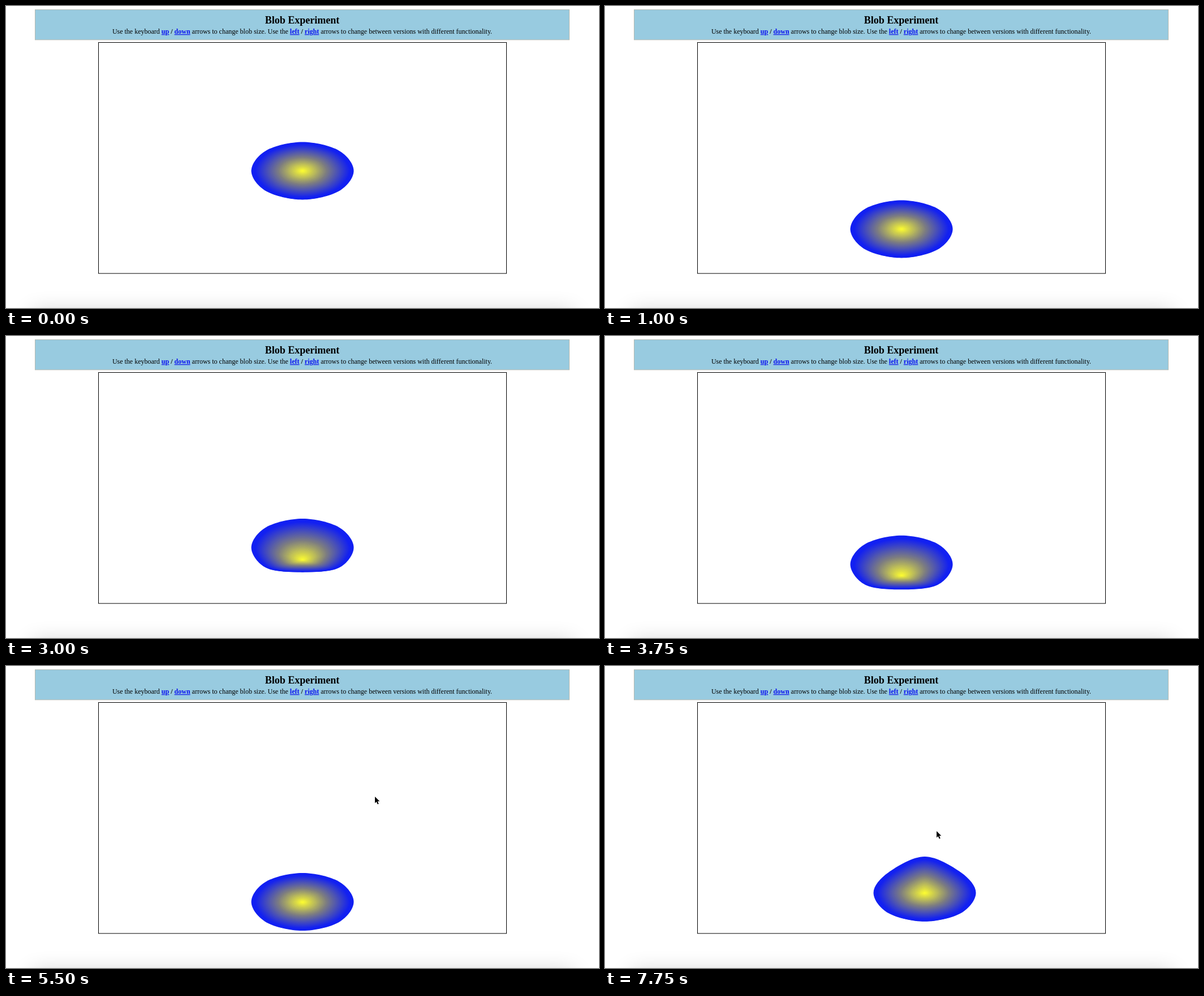
Recreate the animation shown at these times as an HTML page with a canvas. Size 1048 px wide and 534 px high, loop 8000 ms.

```html
<!DOCTYPE html>
<html lang="en">
<head>
<meta charset="utf-8">
<title>Blob Experiment</title>
<style>
  html, body { margin: 0; width: 100%; height: 100%; overflow: hidden; background: #fff; }
  #stage { position: relative; width: 1048px; height: 534px; overflow: hidden; }
  #page, #blob { position: absolute; left: 0; top: 0; }
  #shadow {
    position: absolute; left: 46px; top: 541px; width: 956px; height: 60px;
    box-shadow: 0 0 38px rgba(0, 0, 0, .2);
  }
  text { font-family: "Liberation Serif", "Times New Roman", serif; font-size: 12px; text-anchor: middle; }
  .title { font-size: 18px; font-weight: bold; }
  .keys { font-weight: bold; }
  .link { fill: #0a14f0; text-decoration: underline; }
</style>
</head>
<body>
<div id="stage">
  <div id="shadow"></div>
  <svg id="page" width="1048" height="534">
    <rect x="51.5" y="6.5" width="944" height="53.3" fill="#98cbe0" stroke="#b4bab2"/>
    <text class="title" x="523.5" y="30.5">Blob Experiment</text>
    <text x="523.5" y="49">Use the keyboard <tspan class="keys"><tspan class="link">up</tspan> / <tspan class="link">down</tspan></tspan> arrows to change blob size. Use the <tspan class="keys"><tspan class="link">left</tspan> / <tspan class="link">right</tspan></tspan> arrows to change between versions with different functionality.</text>
    <rect x="163.5" y="64.5" width="721" height="408.4" fill="#fff" stroke="#000"/>
  </svg>
  <canvas id="blob" width="1048" height="534"></canvas>
</div>
<script>
const ctx = document.getElementById('blob').getContext('2d');
const LOOP = 8000, STEP = 250;
const RX = 90.5, RY = 51, REST_X = 524, REST_Y = 419.5, HALF_G = 52;
const RINGS = 90, FADE_END = 0.93;
const INNER = [255, 255, 48], MIDDLE = [127, 127, 127], OUTER = [18, 32, 242];
const arrow = new Path2D('M0 0V11.6L2.7 9.1L4.7 13.6L6.7 12.7L4.7 8.3H8.3Z');

// Tracks of [seconds, value]
const sagTrack = [[1.15, 0], [1.25, 22], [2, 9], [2.5, 14], [3, 22], [3.5, 32], [4, 8], [4.75, 0.5]];
const liftTrack = [[7.25, 0], [7.5, 1], [7.75, 18.5]];
const stretchTrack = [[7, 0], [7.5, 18], [7.75, 13]];
const mouseX = [[5.5, 652], [5.75, 640], [6.25, 556], [6.5, 545], [7, 545], [7.25, 554], [7.5, 570], [7.75, 586]];
const mouseY = [[5.5, 231], [5.75, 262], [6.25, 382], [6.5, 400], [7, 400], [7.25, 380], [7.5, 340], [7.75, 292]];

function track(points, t) {
  if (t <= points[0][0]) return points[0][1];
  for (let i = 1; i < points.length; i++) {
    const [t0, a] = points[i - 1], [t1, b] = points[i];
    if (t <= t1) return a + (b - a) * (t - t0) / (t1 - t0);
  }
  return points[points.length - 1][1];
}

// Height above the floor: one fall, then ever weaker bounces
function height(t) {
  const fall = 1.153;
  if (t < fall) return 128 - 51 * t - HALF_G * t * t;
  t -= fall;
  for (const v of [120.7, 71, 38, 18]) {
    const flight = v / HALF_G;
    if (t < flight) return v * t - HALF_G * t * t;
    t -= flight;
  }
  return 0;
}

// Closed smooth curve through eight points; only top and bottom give way
function outline(x, y, top, bottom) {
  const p = Array.from({ length: 8 }, (_, i) => {
    const a = i * Math.PI / 4;
    const ry = i === 2 ? bottom : i === 6 ? top : RY;
    return [x + RX * Math.cos(a), y + ry * Math.sin(a)];
  });
  const at = i => p[(i + 8) % 8];
  const path = new Path2D();
  path.moveTo(...p[0]);
  for (let i = 0; i < 8; i++) {
    const [a, b, c, d] = [at(i - 1), at(i), at(i + 1), at(i + 2)];
    path.bezierCurveTo(
      b[0] + (c[0] - a[0]) / 6, b[1] + (c[1] - a[1]) / 6,
      c[0] - (d[0] - b[0]) / 6, c[1] - (d[1] - b[1]) / 6,
      c[0], c[1]);
  }
  path.closePath();
  return path;
}

// Yellow at 0, grey halfway, blue from FADE_END outwards
function shade(s) {
  const u = 2 * Math.min(1, s / FADE_END);
  const [from, to, f] = u < 1 ? [INNER, MIDDLE, u] : [MIDDLE, OUTER, u - 1];
  return `rgb(${from.map((c, k) => Math.round(c + (to[k] - c) * f))})`;
}

// Nested outlines shrink towards the core
function drawBlob(path, coreX, coreY) {
  for (let i = RINGS; i > 0; i--) {
    const s = i / RINGS;
    ctx.save();
    ctx.translate(coreX, coreY);
    ctx.scale(s, s);
    ctx.translate(-coreX, -coreY);
    ctx.fillStyle = shade(s);
    ctx.fill(path);
    ctx.restore();
  }
}

function drawMouse(x, y) {
  ctx.save();
  ctx.translate(x, y);
  ctx.lineWidth = 1.6;
  ctx.strokeStyle = '#fff';
  ctx.stroke(arrow);
  ctx.fillStyle = '#000';
  ctx.fill(arrow);
  ctx.restore();
}

function draw(t) {
  const mx = track(mouseX, t), my = track(mouseY, t);
  const x = t > 7 ? REST_X + mx - 545 : REST_X;
  const y = REST_Y - height(t) - track(liftTrack, t);
  const sag = track(sagTrack, t);
  ctx.clearRect(0, 0, 1048, 534);
  drawBlob(outline(x, y, RY + track(stretchTrack, t), RY - sag / 3), x, y + sag);
  if (t >= 5.5) drawMouse(mx, my);
}

const start = performance.now();
let last = -1;
function tick() {
  const step = Math.floor((performance.now() - start) % LOOP / STEP);
  if (step !== last) draw(step * STEP / 1000);
  last = step;
  requestAnimationFrame(tick);
}
tick();
</script>
</body>
</html>
```
